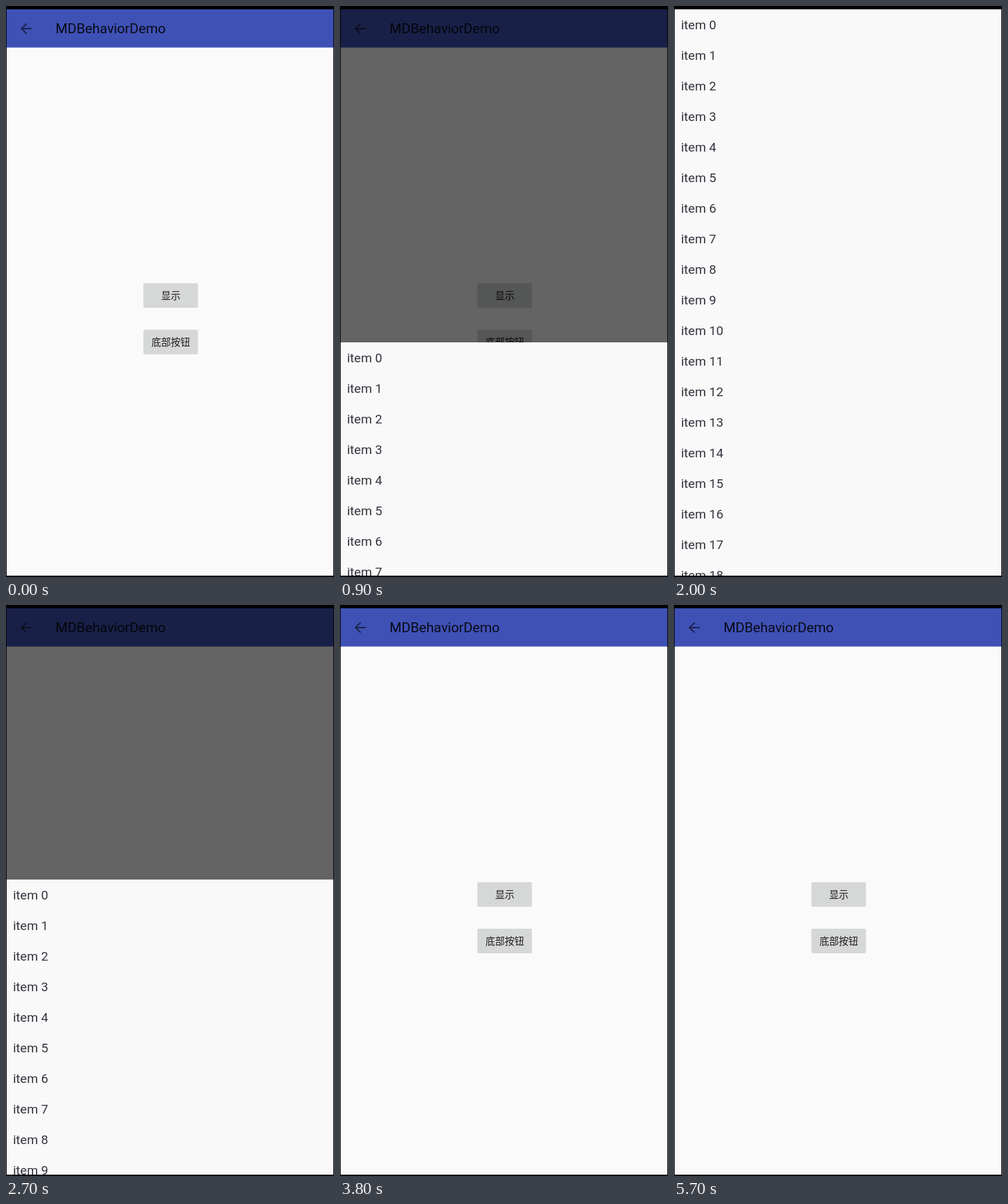
Animation, 493 px wide and 859 px high, one loop 6700 ms. Source, as an HTML page:

```html
<!DOCTYPE html>
<html lang="zh">
<head>
<meta charset="utf-8">
<title>Bottom sheet</title>
<style>
  html, body { margin: 0; width: 100%; height: 100%; overflow: hidden; background: #000; }
  svg { display: block; }
  text { font-family: Roboto, sans-serif; }
  .title { font-size: 20.6px; fill: rgba(0, 0, 0, .87); }
  .label { font: 14.5px "Noto Sans CJK SC", "Noto Sans CJK", sans-serif; fill: #1b1b1b; text-anchor: middle; }
  .item { font-size: 19px; fill: #35343f; }
</style>
</head>
<body>
<svg width="493" height="859">
  <svg x="1" y="5" width="491" height="852" viewBox="1 5 491 852">
    <rect x="1" y="5" width="491" height="852" fill="#fafafa"/>
    <rect x="1" y="5" width="491" height="57.5" fill="#3f51b5"/>
    <path transform="translate(17.8 21.6) scale(1.036)" fill-opacity=".56"
      d="M20 11H7.83l5.59-5.59L12 4l-8 8 8 8 1.41-1.41L7.83 13H20z"/>
    <text class="title" x="74.5" y="41">MDBehaviorDemo</text>

    <rect x="206.5" y="417" width="82" height="37" rx="2" fill="#d6d7d7"/>
    <text class="label" x="247.7" y="441">显示</text>
    <rect x="206.5" y="487" width="82" height="37" rx="2" fill="#d6d7d7"/>
    <rect id="press" x="206.5" y="487" width="82" height="37" rx="2"/>
    <text class="label" x="247.7" y="511">底部按钮</text>

    <rect id="bar" x="1" width="491" height="58" fill="#3f51b5"/>
    <rect id="scrim" x="1" y="5" width="491" height="852"/>
    <g id="sheet"><rect x="1" width="491" height="860" fill="#f9f9f9"/></g>
  </svg>
</svg>
<script>
const LOOP = 6700, TICK = 100;
const BOTTOM = 857, PEEK = 506, FULL = 5, BAR = 799, DIM = 0.6;
const $ = id => document.getElementById(id);
const [press, bar, scrim, sheet] = ['press', 'bar', 'scrim', 'sheet'].map($);

for (let i = 0; i < 19; i++) {
  const row = document.createElementNS('http://www.w3.org/2000/svg', 'text');
  row.setAttribute('class', 'item');
  row.setAttribute('x', 10.5);
  row.setAttribute('y', 30 + 46 * i);
  row.textContent = 'item ' + i;
  sheet.append(row);
}

const linear = p => p;
const smooth = p => p * p * (3 - 2 * p);
const slow = power => p => 1 - (1 - p) ** power;

// The first tick of a move already shows progress; the tick at `end` completes it.
const move = (start, end, from, to, ease) => ({
  start,
  at: t => from + (to - from) * ease(Math.min(1, (t - start + TICK) / (end - start + TICK)))
});

// The latest move that has begun sets the value.
const track = (rest, ...moves) => t => moves.findLast(m => m.start <= t)?.at(t) ?? rest;

const sheetTop = track(BOTTOM,
  move(700, 900, PEEK + 170, PEEK, slow(2)),
  move(1500, 2000, PEEK, FULL, smooth),
  move(2500, 2900, FULL, PEEK, slow(1.84)),
  move(3200, 3500, PEEK, BOTTOM, slow(1.9)));
const sheetAlpha = track(0, move(700, 900, 0, 1, smooth));
const dim = track(0,
  move(700, 900, 0, DIM, smooth),
  move(3500, 3800, DIM, 0, smooth));
const barTop = track(BOTTOM,
  move(4200, 4500, BOTTOM, BAR, smooth),
  move(5400, 5700, BAR, BOTTOM, smooth));
const pressed = track(0, move(4200, 4500, 0.08, 0, linear));

function draw() {
  const now = performance.now() % LOOP;
  const t = now - now % TICK;
  sheet.setAttribute('transform', `translate(0 ${Math.round(sheetTop(t))})`);
  sheet.setAttribute('opacity', sheetAlpha(t));
  scrim.setAttribute('opacity', dim(t));
  bar.setAttribute('y', Math.round(barTop(t)));
  press.setAttribute('opacity', pressed(t));
  requestAnimationFrame(draw);
}
draw();
</script>
</body>
</html>
```
